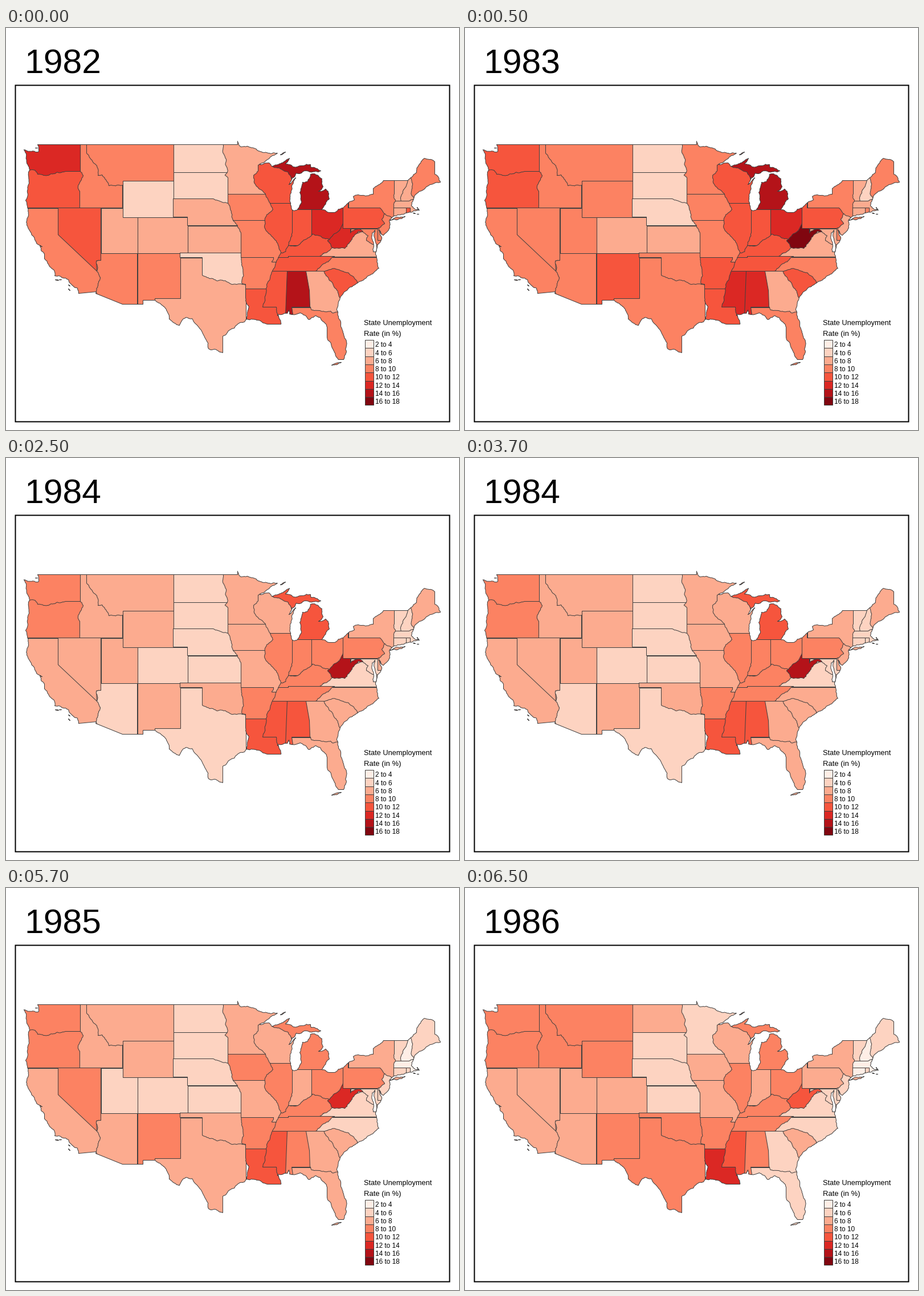
Recreate the animation shown at these times as a matplotlib script. Size 795 by 705 pixels, loop 8 s.

```python
import numpy as np
import matplotlib.pyplot as plt
from matplotlib.animation import FuncAnimation
from matplotlib.patches import Polygon, Rectangle

W, H, DPI = 795, 705, 100
PX = 72 / DPI
INK = "#404040"
SHADES = ["#feeee6", "#fdd3c1", "#fcab8f", "#fc8262",
          "#f6553d", "#db2824", "#b41319", "#800610"]

# For each year: states in each class, from the lowest rate to the highest.
YEARS = {
    1982: ["", "WY ND SD OK", "UT CO NE KS TX MN GA VA CT MA VT NH",
           "CA ID MT AZ NM IA MO AR FL NC MD DE NJ NY ME",
           "OR NV LA WI IL IN KY TN MS SC PA RI", "WA OH WV", "MI AL", ""],
    1983: ["", "ND SD NE NH", "CO KS GA VA MD NJ CT MA VT",
           "CA NV ID MT WY UT AZ OK TX MN IA MO FL NC DE NY RI ME",
           "WA OR NM AR LA WI IL IN KY TN SC PA", "OH MS AL", "MI", "WV"],
    1984: ["", "CO AZ ND SD NE KS TX VA MD CT RI MA VT NH",
           "CA NV ID MT WY UT NM OK MN IA MO WI GA FL SC NC DE NJ NY ME",
           "WA OR AR IL IN OH KY TN PA", "LA MI MS AL", "", "WV", ""],
    1985: ["MA NH", "UT CO ND SD NE KS NC VA MD DE NJ CT RI VT ME",
           "CA ID MT WY AZ OK TX MN MO WI IN GA FL SC NY",
           "WA OR NV NM IA AR IL MI OH KY TN AL PA", "LA MS", "WV", "", ""],
    1986: ["CT MA NH", "SD NE KS MN GA FL NC VA MD DE NJ RI VT ME",
           "CA NV UT CO AZ ND IA MO WI IN SC PA NY",
           "WA OR ID MT WY NM OK TX AR IL MI OH KY TN AL",
           "MS WV", "LA", "", ""],
}

rng = np.random.default_rng(7)
fig = plt.figure(figsize=(W / DPI, H / DPI), dpi=DPI, facecolor="white")
ax = fig.add_axes([0, 0, 1, 1])
ax.set(xlim=(0, W), ylim=(H, 0))
ax.axis("off")


def project(coords):
    """West longitude / north latitude pairs to pixel centres."""
    lon, lat = np.reshape(coords, (-1, 2)).T
    xy = np.column_stack([1610.6 - 12.66 * lon, 981.7 - 15.87 * lat])
    return np.floor(xy) + .5


def roughen(pts):
    """Fractal wiggle; meridians and parallels stay straight."""
    for _ in range(4):
        step = np.diff(pts, axis=0)
        size = np.hypot(*step.T)
        bend = np.clip(.13 * size, 0, 2.2) * rng.uniform(-1, 1, len(size))
        bend[(step == 0).any(axis=1)] = 0
        normal = step[:, ::-1] * [-1, 1] / np.maximum(size, 1e-9)[:, None]
        out = np.empty((2 * len(pts) - 1, 2))
        out[::2] = pts
        out[1::2] = pts[:-1] + step / 2 + normal * bend[:, None]
        pts = out
    return pts


coast = Polygon(np.vstack([
    # northern border and lake shores, west to east
    roughen(project([
        124.7, 48.4, 123.1, 48.15, 122.7, 48.2, 122.8, 49, 95.15, 49, 95.15, 49.38, 94.6, 48.7, 92.9, 48.6,
        91.5, 48.07, 89.6, 48, 92, 46.75, 90.8, 46.95, 90.4, 46.57, 88.1, 46.3, 87.6, 45.1, 88, 44.55,
        87.05, 45.3, 87.7, 43.7, 87.8, 42.3, 87.5, 41.7, 86.82, 41.76, 83.45, 41.76, 82.5, 41.45,
        81.7, 41.5, 80.5, 42, 78.9, 42.85, 79.05, 43.27, 76.3, 43.5, 76.3, 44.1, 74.9, 45.01, 71.5, 45.01,
        71.1, 45.3, 70.3, 45.9, 70, 46.7, 69.23, 47.46, 68.3, 47.36, 67.8, 47.07, 67.8, 45.7, 67, 44.8])),
    # Atlantic
    roughen(project([
        67, 44.8, 68.8, 44.4, 70.2, 43.6, 70.8, 42.85, 71, 42.25, 70.5, 41.78, 70.05, 41.78, 70.2, 42.07,
        69.95, 41.7, 71.4, 41.5, 72.9, 41.25, 73.9, 40.8, 74.1, 40.5, 74.05, 39.8, 74.9, 38.95, 75.5, 39.5,
        75.1, 38.7, 75.95, 37.15, 76, 36.9, 75.5, 35.3, 76.5, 34.7, 77.9, 33.9, 79.1, 33.4, 80.9, 32,
        81.4, 30.7, 80.55, 28.4, 80.03, 26.8, 80.4, 25.2])),
    # Gulf and the southern rivers
    roughen(project([
        80.4, 25.2, 81.1, 25.2, 81.85, 26.3, 82.7, 27.7, 82.7, 28.8, 83.7, 29.9, 84.3, 30.05, 85.2, 29.65,
        86.4, 30.4, 87.9, 30.25, 88, 30.7, 88.2, 30.35, 89.5, 30.2, 89.1, 29.1, 90.9, 29.1, 92.3, 29.55,
        93.84, 29.69, 95.1, 29.1, 97.2, 27.8, 97.15, 25.96, 99.1, 26.4, 99.5, 27.5, 101.4, 29.77,
        102.3, 29.88, 103.15, 28.98, 104.6, 29.7, 104.9, 30.57, 106.53, 31.78])),
    project([108.21, 31.78, 108.21, 31.33, 111.07, 31.33, 114.81, 32.5, 114.72, 32.72, 117.13, 32.53]),
    # Pacific, south to north
    roughen(project([
        117.13, 32.53, 117.3, 33.1, 118.4, 33.75, 118.6, 34.03, 120.5, 34.45, 120.65, 35.15, 121.9, 36.4,
        121.9, 36.9, 122.5, 37.8, 122.2, 37.7, 123, 38.1, 123.8, 39.3, 124.4, 40.4, 124.1, 41.5,
        124.5, 42.8, 124.05, 44.7, 123.95, 46.2, 124.7, 48.4])),
]), fc="none", ec=INK, lw=PX, zorder=2)
ax.add_patch(coast)

areas = []


def add_area(code, pts, inland):
    patch = ax.add_patch(Polygon(pts, ec=INK, lw=PX, zorder=1 if inland else 3))
    if inland:
        patch.set_clip_path(coast)
    areas.append((code, patch))


def state(code, *coords, rough=True, inland=True):
    """States overlap: each hides the spare parts of those before it."""
    pts = project(coords + coords[:2])
    add_area(code, roughen(pts) if rough else pts, inland)


def box(code, west, south, east, north):
    state(code, west, north, east, north, east, south, west, south)


# West
box("MT", 117, 44, 104.05, 49.5)
state("ID", 117.03, 49.5, 116.05, 49.5, 116.05, 48, 114.6, 46.64, 114.5, 45.55, 113.9, 45.65,
      113, 44.45, 111.05, 44.5, 111.05, 42, 117.5, 42, 117.5, 46, 117.03, 46)
box("WA", 126, 45, 117.03, 49.5)
box("CA", 126, 32, 114.1, 42)
state("OR", 126, 46.25, 123.2, 46.15, 122.8, 45.7, 121.2, 45.65, 119, 46, 116.92, 46, 116.5, 45.6,
      117.2, 44.4, 117.03, 43.8, 117.03, 42, 126, 42)
state("NV", 120, 42, 114.04, 42, 114.04, 36.2, 114.7, 36.1, 114.63, 35, 120, 39, rough=False)
state("AZ", 114.04, 37, 109.05, 37, 109.05, 31, 114.81, 31, 114.72, 32.7, 114.5, 33.4,
      114.14, 34.3, 114.63, 35, 114.7, 36.1, 114.04, 36.2)
box("UT", 114.04, 37, 109.05, 42)
box("WY", 111.05, 41, 104.05, 45)
box("CO", 109.05, 37, 102.05, 41)
box("NM", 109.05, 31, 103.05, 37)

# Plains
box("ND", 104.05, 45.94, 96, 49.5)
box("SD", 104.05, 42.4, 96, 45.94)
box("KS", 102.05, 37, 94, 40)
state("NE", 104.05, 43, 98.5, 43, 97.9, 42.8, 96.44, 42.49, 95, 42.49, 95, 40, 102.05, 40,
      102.05, 41, 104.05, 41)
state("TX", 106.62, 32, 103.05, 32, 103.05, 36.5, 94, 36.5, 94, 25, 106.62, 25)
state("OK", 103.05, 37, 94, 37, 94, 33.5, 96.5, 33.8, 97.9, 33.9, 98.6, 34.15, 100, 34.56,
      100, 36.5, 103.05, 36.5)
state("MN", 97.23, 49.5, 96.85, 47.6, 96.56, 45.94, 96.85, 45.6, 96.45, 45.3, 96.45, 43.5, 89, 43.5,
      89, 49.5)
state("IA", 96.45, 43.5, 90, 43.5, 90, 40.6, 95.77, 40.6, 95.9, 41.3, 96.44, 42.49)
state("AR", 94.62, 36.5, 89.5, 36.5, 89.5, 33, 94.04, 33, 94.04, 33.55, 94.45, 33.6, 94.43, 35.4)
state("MO", 95.77, 40.6, 89, 40.6, 89, 36, 90.38, 36, 90.1, 36.5, 94.62, 36.5, 94.62, 39.1, 95, 39.8)
state("LA", 94.04, 33, 89, 33, 89, 28.5, 93.84, 28.5, 93.75, 30.3, 93.55, 31.1, 94.04, 32)

# Lakes and Ohio valley
state("WI", 92.29, 46.72, 90.8, 47.1, 86.5, 46.5, 86.5, 42.5, 90.64, 42.5, 91.22, 43.5, 92.8, 44.75,
      92.88, 45.6, 92.29, 46.1)
state("IL", 90.64, 42.5, 87, 42.5, 87, 37, 89.13, 37, 90.2, 38.7, 91.4, 39.9, 91.05, 41.2, 90.2, 41.8)
state("IN", 87.53, 41.76, 84.81, 41.76, 84.81, 37.8, 88.05, 37.8, 87.53, 39.3)
state("OH", 84.81, 41.76, 83.45, 41.76, 82, 42, 80.52, 42.2, 80.52, 38, 84.81, 38)

# South and Atlantic
box("NC", 84.32, 33.5, 75, 36.57)
box("FL", 87.7, 24, 79.5, 31)
state("GA", 86, 35, 80.5, 35, 80.5, 30.7, 82, 30.4, 82.2, 30.57, 84.86, 30.7, 85, 31, 86, 31)
state("SC", 83.1, 35, 82.3, 35.2, 81, 35.1, 79.67, 34.8, 78.55, 33.86, 78.5, 32, 80, 31.5,
      80.9, 32, 81.45, 33, 82.9, 34.5)
state("MS", 91.6, 31, 89.73, 31, 89.55, 30.1, 88, 30.1, 88, 35, 90.3, 35, 91.17, 33)
state("AL", 88.2, 35, 85.61, 35, 85.18, 32.87, 85.05, 31, 87.6, 31, 87.45, 30.2, 88.45, 30.1, rough=False)
box("MD", 79.48, 37.9, 75, 39.72)
box("DE", 75.79, 38.45, 75, 39.84)
state("VA", 83.7, 36.57, 75, 36.57, 75, 38.02, 76.3, 37.95, 77.25, 38.4, 77.05, 38.9, 77.72, 39.32,
      82.3, 37.7)
state("TN", 90.3, 35, 89.5, 36.5, 88.06, 36.5, 88.06, 36.6, 81.68, 36.6, 82.9, 35.95, 84.32, 35)
state("KY", 89.42, 36.5, 88.06, 36.5, 88.06, 36.6, 83.7, 36.6, 81.9, 37.6, 82, 38.4, 83.3, 38.65,
      84.8, 39.1, 85.6, 38.5, 86.5, 37.95, 88.05, 37.82, 88.5, 37.1, 89.13, 37)
state("WV", 82.6, 38.4, 81.8, 39.1, 80.85, 39.7, 80.52, 40.64, 80.52, 39.72, 79.48, 39.72, 79.48, 39.2,
      78.2, 39.65, 77.72, 39.32, 78.35, 39.4, 79.3, 38.42, 80.3, 37.5, 81.97, 37.54)
box("NY", 79.8, 40.4, 73, 45.3)
state("NJ", 74.7, 41.36, 73.9, 41, 73.5, 40.3, 73.5, 38.8, 74.95, 38.8, 75.55, 39.6, 75.5, 41)
state("PA", 80.52, 42.5, 79.76, 42.5, 79.76, 42, 75.35, 42, 74.7, 41.36, 75.15, 40.7, 74.75, 40.2,
      75.42, 39.8, 75.79, 39.72, 80.52, 39.72)
box("ME", 71.3, 43, 66, 48)
state("NH", 71.08, 45.4, 70.98, 43.4, 70.6, 43, 70.8, 42.7, 73, 42.7, 73, 45.4)
state("VT", 73.35, 45.3, 71.5, 45.3, 71.5, 45, 72.1, 44, 72.46, 42.7, 73.27, 42.7, 73.4, 43.6)
state("MA", 73.27, 42.74, 71.3, 42.74, 70.8, 42.9, 69.5, 42.9, 69.5, 41.3, 73.5, 41.3, 73.5, 42.04)
box("CT", 73.55, 40.9, 71.8, 42.04)
box("RI", 71.8, 41.2, 71.25, 42.04)

# Peninsulas and open water beyond the coast line
state("MI", 90.4, 46.57, 89, 46.97, 87.9, 47.48, 88.45, 46.8, 87.4, 46.5, 86.2, 46.67, 85, 46.75,
      84.9, 46.48, 83.6, 46.1, 83.9, 45.95, 85.5, 46.1, 86.5, 45.75, 87, 45.8, 87.6, 45.1, 88.1, 45.9,
      inland=False)
state("MI", 86.82, 41.76, 86.25, 42.6, 86.5, 43.7, 86.1, 44.8, 85.5, 44.9, 85, 45.7, 84.75, 45.78,
      83.4, 45.2, 83.3, 44.3, 83.9, 43.8, 82.9, 44.07, 82.42, 43, 83.2, 42.1, 83.45, 41.76, inland=False)
state("bay", 75.9, 37.1, 76.3, 37.1, 76.4, 38.3, 76.45, 39.2, 76.1, 39.5, 76.2, 38.9, 75.8, 37.95,
      inland=False)

# Islands: a sliver from one tip to the other
for code, *tips in [("CA", 120.4, 34.04, 119.9, 33.96), ("CA", 119.8, 34.05, 119.5, 34.02),
                    ("CA", 118.6, 33.45, 118.3, 33.33), ("CA", 118.6, 33, 118.35, 32.82),
                    ("WA", 123.15, 48.6, 122.85, 48.6), ("MI", 89.2, 47.87, 88.45, 48.17),
                    ("FL", 82.1, 24.58, 80.75, 24.9), ("NY", 74, 40.62, 71.9, 41.05),
                    ("MA", 70.8, 41.4, 70.5, 41.37), ("MA", 70.2, 41.28, 69.98, 41.3)]:
    a, b = project(tips)
    across = (b - a)[::-1] * [-.08, .08]
    mid = (a + b) / 2
    add_area(code, roughen(np.array([a, mid + across, b, mid - across, a])), False)


def label(x, y, text, size):
    return ax.text(x, y, text, size=size * PX, family="Liberation Sans", va="baseline")


ax.add_patch(Rectangle((16.5, 100.5), 762, 590, fill=False, ec="black", lw=2 * PX, snap=False))
label(628, 521, "State Unemployment", 12.8)
label(628, 540, "Rate (in %)", 13)
for i, shade in enumerate(SHADES):
    top = 547 + 14.3 * i
    ax.add_patch(Rectangle((629.5, top), 15, 14.3, fc=shade, ec=INK, lw=PX))
    label(647.5, top + 12.3, f"{2 * i + 2} to {2 * i + 4}", 11.8)
title = label(32.5, 79.5, "", 60.5)


def update(frame):
    year = 1982 + (frame + 3) // 4
    title.set_text(str(year))
    shade_of = {s: shade for group, shade in zip(YEARS[year], SHADES) for s in group.split()}
    for code, patch in areas:
        patch.set_facecolor(shade_of.get(code, "white"))
    return [title] + [patch for _, patch in areas]


anim = FuncAnimation(fig, update, frames=16, interval=500, repeat=True, repeat_delay=0)
plt.show()
```
